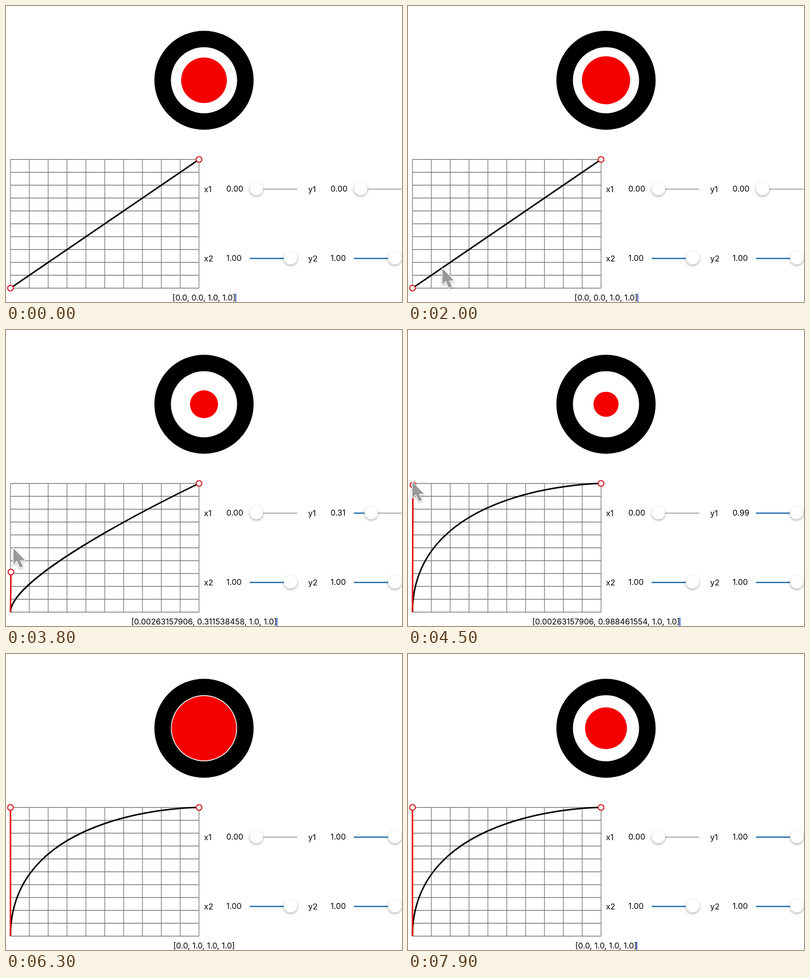
Recreate the animation shown at these times as an HTML page with a canvas. Size 798x598 px, loop 8000 ms.

```html
<!DOCTYPE html>
<html lang="en">
<head>
<meta charset="utf-8">
<title>Easing editor</title>
<style>
html, body { margin: 0; width: 100%; height: 100%; overflow: hidden; background: #fff; }
canvas { display: block; }
</style>
</head>
<body>
<canvas id="stage" width="798" height="598"></canvas>
<script>
const ctx = document.getElementById('stage').getContext('2d');
const LOOP = 8000, TICK = 100, HALF = 1500;
const GRID = { x: 9, y: 310, w: 380, h: 260 };
const R_MIN = 8.6, R_MAX = 66.67;
const FONT = '16px Inter, Roboto, sans-serif';
const RED = '#f50000', BLUE = '#1769ae', GRAY = '#747474';

const clamp = v => Math.min(1, Math.max(0, v));
const lerp = (a, b, k) => a + (b - a) * k;
const smooth = k => k * k * (3 - 2 * k);
const progress = (t, from, to) => clamp((t - from) / (to - from));
const gx = v => GRID.x + v * GRID.w;
const gy = v => GRID.y + (1 - v) * GRID.h;

// First control point while its handle is being dragged; the second stays at (1, 1).
function controlPoint(t) {
  const first = lerp(0, 81, progress(t, 3000, 3495));
  const pixels = Math.round(lerp(first, 257, smooth(progress(t, 4000, 4450))));
  const done = t >= 5100;
  return {
    x: t > 3000 && !done ? 1 / GRID.w : 0,
    y: done ? 1 : pixels / GRID.h
  };
}

function bezier(a, b, s) {
  const q = 1 - s;
  return 3 * q * q * s * a + 3 * q * s * s * b + s * s * s;
}

function ease(p, k) {
  let lo = 0, hi = 1;
  for (let i = 0; i < 30; i++) {
    const mid = (lo + hi) / 2;
    if (bezier(p.x, 1, mid) < k) lo = mid; else hi = mid;
  }
  return bezier(p.y, 1, lo);
}

// The pulse starts over whenever the curve is edited.
function pulseTime(t) {
  if (t < 3000) return t + 2 * HALF - 968;
  if (t < 3495) return 0;
  if (t < 4000) return t - 3495;
  if (t < 4450) return 0;
  if (t < 4820) return t - 4450;
  if (t < 5136) return 0;
  return t - 5136;
}

function pulseRadius(t, p) {
  const k = pulseTime(t) / HALF % 2;
  return lerp(R_MIN, R_MAX, ease(p, k > 1 ? 2 - k : k));
}

function disc(x, y, r, color) {
  ctx.beginPath();
  ctx.arc(x, y, r, 0, Math.PI * 2);
  ctx.fillStyle = color;
  ctx.fill();
}

function line(x1, y1, x2, y2, color, width) {
  ctx.beginPath();
  ctx.moveTo(x1, y1);
  ctx.lineTo(x2, y2);
  ctx.strokeStyle = color;
  ctx.lineWidth = width;
  ctx.stroke();
}

function text(str, x, y, align = 'left') {
  ctx.font = FONT;
  ctx.textAlign = align;
  ctx.fillStyle = '#000';
  ctx.fillText(str, x, y);
}

function drawTarget(r) {
  disc(399, 150, 100, '#000');
  disc(399, 150, R_MAX, '#fff');
  disc(399, 150, r, RED);
}

// Handles are small octagons.
function drawHandle(x, y) {
  ctx.beginPath();
  for (let i = 0; i < 8; i++) {
    const a = (i + 0.5) * Math.PI / 4;
    ctx.lineTo(x + 6 * Math.cos(a), y + 6 * Math.sin(a));
  }
  ctx.closePath();
  ctx.fillStyle = '#fff';
  ctx.fill();
  ctx.strokeStyle = '#d3141a';
  ctx.lineWidth = 2;
  ctx.stroke();
}

function drawGraph(p) {
  for (let i = 0; i <= 10; i++) {
    const x = gx(i / 10), y = gy(i / 10);
    line(x, gy(1), x, gy(0), GRAY, 1.3);
    line(gx(0), y, gx(1), y, GRAY, 1.3);
  }
  ctx.beginPath();
  ctx.moveTo(gx(0), gy(0));
  ctx.bezierCurveTo(gx(p.x), gy(p.y), gx(1), gy(1), gx(1), gy(1));
  ctx.strokeStyle = '#000';
  ctx.lineWidth = 3;
  ctx.stroke();
  if (p.y > 0) line(gx(0), gy(0), gx(p.x), gy(p.y), '#e60a10', 3);
  drawHandle(gx(p.x), gy(p.y));
  drawHandle(gx(1), gy(1));
}

function drawSlider(label, value, x, y) {
  text(label, x, y + 6);
  text(value.toFixed(2), x + 45, y + 5);
  const left = x + 92, knob = left + 13.5 + 69 * value;
  line(left, y, left + 96, y, '#a9a9a9', 2);
  if (value > 0.005) line(left, y, knob, y, BLUE, 2.3);
  ctx.save();
  ctx.shadowColor = 'rgba(0,0,0,.34)';
  ctx.shadowBlur = 5;
  ctx.shadowOffsetY = 2;
  disc(knob, y - 1, 13.5, '#fff');
  ctx.restore();
}

function floatText(v) {
  const n = Number(Math.fround(v).toPrecision(9));
  return Number.isInteger(n) ? n.toFixed(1) : String(n);
}

function caretOn(t) {
  if (t >= 3000 && t < 4900) return true;
  return t < 3000 ? t % 1000 < 500 : t % 1000 >= 500;
}

function drawField(p, t) {
  const str = '[' + [p.x, p.y, 1, 1].map(floatText).join(', ') + ']';
  text(str, 399, 595, 'center');
  if (!caretOn(t)) return;
  ctx.fillStyle = '#3c5fd2';
  ctx.fillRect(Math.round(399 + ctx.measureText(str).width / 2) - 1, 581, 2, 17);
}

// Time, x and y of the pointer's stops.
const STOPS = [
  [500, 560, 604], [950, 389, 310], [1400, 389, 310], [2200, 9, 570],
  [3000, 9, 570], [3495, 10, 489], [3600, 12, 475], [3800, 14, 440],
  [4000, 14, 440], [4450, 8, 306], [4820, 8, 306], [5136, -40, 300]
];

function drawPointer(t) {
  const i = STOPS.findIndex(s => s[0] > t);
  if (i < 1) return;
  const a = STOPS[i - 1], b = STOPS[i];
  const k = smooth(progress(t, a[0], b[0]));
  ctx.save();
  ctx.translate(lerp(a[1], b[1], k), lerp(a[2], b[2], k));
  ctx.beginPath();
  for (const [x, y] of [[1, 1], [1, 33], [8, 26], [14, 40], [20, 37], [14, 25], [24, 25]]) ctx.lineTo(x, y);
  ctx.closePath();
  ctx.shadowColor = 'rgba(0,0,0,.3)';
  ctx.shadowBlur = 4;
  ctx.shadowOffsetY = 2;
  ctx.lineWidth = 3;
  ctx.lineJoin = 'round';
  ctx.strokeStyle = 'rgba(255,255,255,.85)';
  ctx.stroke();
  ctx.shadowColor = 'transparent';
  ctx.fillStyle = '#999';
  ctx.fill();
  ctx.restore();
}

function draw(t) {
  const p = controlPoint(t);
  ctx.fillStyle = '#fff';
  ctx.fillRect(0, 0, 798, 598);
  drawTarget(pulseRadius(t, p));
  drawGraph(p);
  drawSlider('x1', p.x, 399, 370);
  drawSlider('y1', p.y, 609, 370);
  drawSlider('x2', 1, 399, 510);
  drawSlider('y2', 1, 609, 510);
  drawField(p, t);
  drawPointer(t);
}

let start;
function frame(now) {
  if (start === undefined) start = now;
  draw(Math.floor((now - start) % LOOP / TICK) * TICK);
  requestAnimationFrame(frame);
}
draw(0);
requestAnimationFrame(frame);
</script>
</body>
</html>
```
